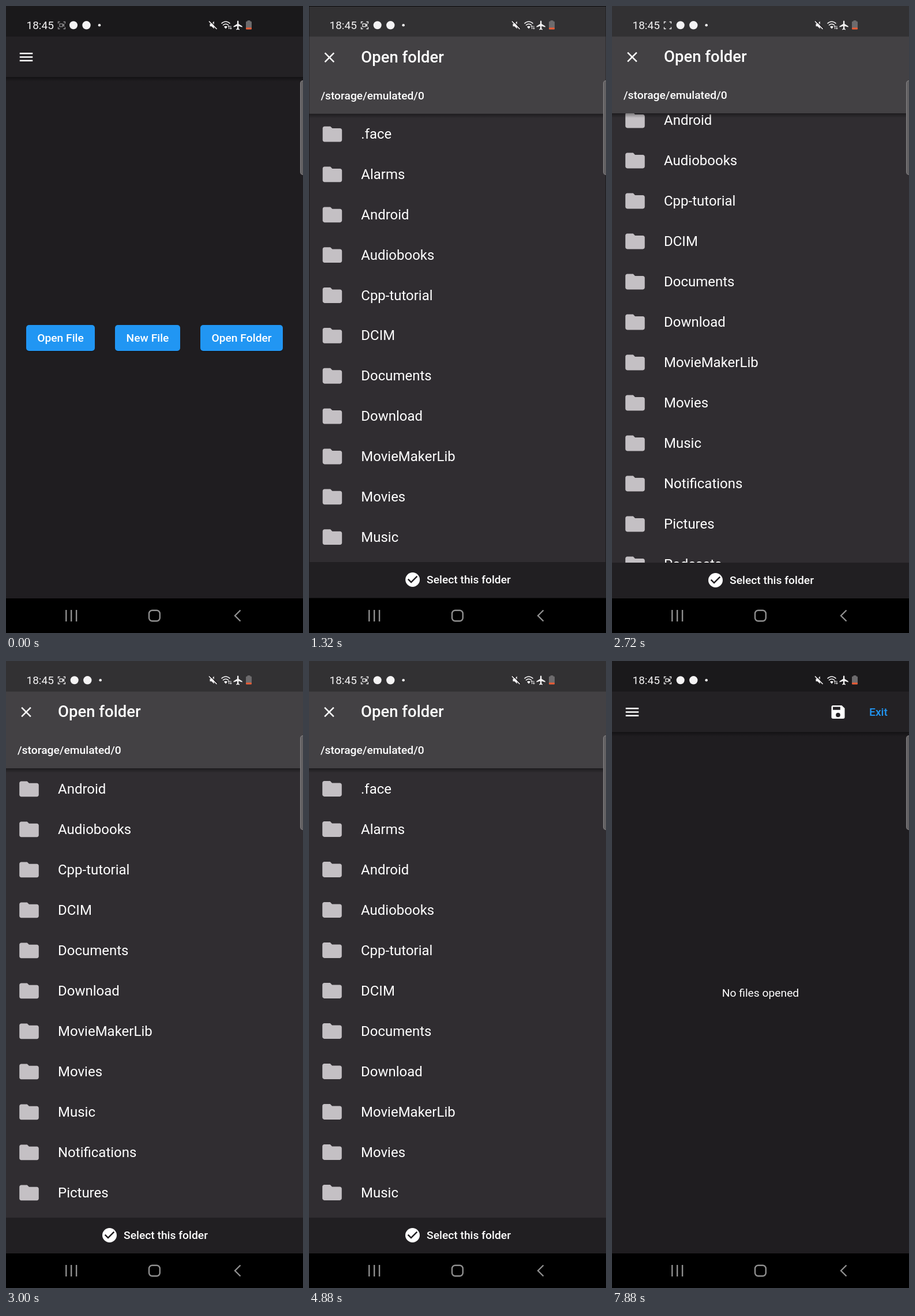
These frames come from a looping animation (515x1087 px, 8280 ms). An HTML page with a canvas:

```html
<!DOCTYPE html>
<html lang="en">
<head>
<meta charset="utf-8">
<title>Open folder</title>
<style>
  html, body { margin: 0; width: 100%; height: 100%; overflow: hidden; background: #000; }
  canvas { display: block; }
</style>
</head>
<body>
<canvas id="stage" width="515" height="1087"></canvas>
<script>
const W = 515, H = 1087, VIEW = 1027, LOOP = 8280;
const OPEN = 1109, CLOSE = 5694, ROUTE = 300;
const PRESS = 826;
const stage = document.getElementById('stage').getContext('2d');
const layerCanvas = Object.assign(document.createElement('canvas'), { width: W, height: H });
const layer = layerCanvas.getContext('2d');
let c = stage;

const folders = ['.face', 'Alarms', 'Android', 'Audiobooks', 'Cpp-tutorial', 'DCIM', 'Documents',
  'Download', 'MovieMakerLib', 'Movies', 'Music', 'Notifications', 'Pictures', 'Podcasts', 'Ringtones'];

// Icon outlines on a 24-unit grid
const icons = {
  menu: 'M3 18h18v-2H3zm0-5h18v-2H3zm0-7v2h18V6z',
  close: 'M19 6.41 17.59 5 12 10.59 6.41 5 5 6.41 10.59 12 5 17.59 6.41 19 12 13.41 17.59 19 19 17.59 13.41 12z',
  folder: 'M10 4H4c-1.1 0-2 .9-2 2v12c0 1.1.9 2 2 2h16c1.1 0 2-.9 2-2V8c0-1.1-.9-2-2-2h-8z',
  save: 'M17 3H5c-1.1 0-2 .9-2 2v14c0 1.1.9 2 2 2h14c1.1 0 2-.9 2-2V7zM12 19a3 3 0 1 1 0-6 3 3 0 0 1 0 6M15 9H5V5h10z',
  check: 'M12 2a10 10 0 1 0 0 20 10 10 0 0 0 0-20M10 17l-5-5 1.41-1.41L10 14.17l7.59-7.59L19 8z',
  plane: 'M21 16v-2l-8-5V3.5a1.5 1.5 0 0 0-3 0V9l-8 5v2l8-2.5V19l-2 1.5V22l3.5-1 3.5 1v-1.5L13 19v-5.5z',
  speaker: 'M3 9v6h4l6 6V3L7 9z'
};
for (const name in icons) icons[name] = new Path2D(icons[name]);

const clamp = x => Math.max(0, Math.min(1, x));
const span = (t, a, b) => clamp((t - a) / (b - a));
const mix = (a, b, k) => a + (b - a) * k;

function bezier(x1, y1, x2, y2, x) {
  const at = (a, b, s) => 3 * (1 - s) * (1 - s) * s * a + 3 * (1 - s) * s * s * b + s ** 3;
  let lo = 0, hi = 1;
  for (let i = 0; i < 24; i++) {
    const mid = (lo + hi) / 2;
    if (at(x1, x2, mid) < x) lo = mid; else hi = mid;
  }
  return at(y1, y2, lo);
}

// Two-part emphasised curve of the page zoom
function zoomEase(p) {
  return p < 1 / 6
    ? 0.4 * bezier(0.05, 0, 0.1333, 0.06, p * 6)
    : 0.4 + 0.6 * bezier(0.2083, 0.82, 0.25, 1, (p - 1 / 6) * 1.2);
}

function rect(x, y, w, h, color, r = 0) {
  c.fillStyle = color;
  c.beginPath();
  c.roundRect(x, y, w, h, r);
  c.fill();
}

function dot(x, y, r, color) {
  c.fillStyle = color;
  c.beginPath();
  c.arc(x, y, r, 0, 7);
  c.fill();
}

function stroke(d, color, width) {
  c.strokeStyle = color;
  c.lineWidth = width;
  c.stroke(new Path2D(d));
}

function icon(name, x, y, scale = 1.25, color = '#fff') {
  c.save();
  c.translate(x - 12 * scale, y - 12 * scale);
  c.scale(scale, scale);
  c.fillStyle = color;
  c.fill(icons[name], 'evenodd');
  c.restore();
}

function text(s, x, y, size, { weight = 500, align = 'left', color = '#fff' } = {}) {
  c.font = `${weight} ${size}px Roboto, sans-serif`;
  c.textAlign = align;
  c.fillStyle = color;
  c.fillText(s, x, y + size * 0.342);
}

function shadow(y) {
  const g = c.createLinearGradient(0, y, 0, y + 8);
  g.addColorStop(0, 'rgba(0,0,0,.38)');
  g.addColorStop(1, 'rgba(0,0,0,0)');
  c.fillStyle = g;
  c.fillRect(0, y, W, 8);
}

function zoomed(scale, draw) {
  c.save();
  c.beginPath();
  c.rect(0, 0, W, VIEW);
  c.clip();
  c.translate(W / 2, VIEW / 2);
  c.scale(scale, scale);
  c.translate(-W / 2, -VIEW / 2);
  draw();
  c.restore();
}

function page() {
  rect(0, 0, W, VIEW, '#1f1d20');
  shadow(123);
  rect(0, 0, W, 123, '#232124');
  icon('menu', 35, 88.5);
}

function button(label, x, w) {
  rect(x, 554.5, w, 45, 'rgba(0,0,0,.3)', 5);
  rect(x, 553, w, 45, '#2196f3', 5);
  return () => text(label, x + w / 2, 575.5, 19.25, { align: 'center' });
}

function home(t) {
  page();
  button('Open File', 35, 119)();
  button('New File', 189, 113)();
  const label = button('Open Folder', 337, 143);
  if (t > PRESS) {
    const k = span(t, PRESS, 1350);
    const alpha = 0.26 * span(t, PRESS, 900) * (1 - span(t, 1180, 1400));
    c.save();
    c.beginPath();
    c.roundRect(337, 553, 143, 45, 5);
    c.clip();
    dot(mix(426, 415, k), mix(580, 576, k), mix(22, 75, k), `rgba(255,255,255,${alpha})`);
    c.restore();
  }
  label();
}

function editor() {
  page();
  icon('save', 392, 88.5, 1.28);
  text('Exit', 462, 88.5, 19.25, { align: 'center', color: '#2196f3' });
  text('No files opened', W / 2, 575, 19.25, { weight: 400, align: 'center' });
}

function scrollAt(t) {
  const up = span(t, 2490, 2870), down = span(t, 2870, 3320);
  return 248 * up * up * (3 - 2 * up) * (1 - down ** 1.5) ** 3.36;
}

function picker(t) {
  rect(0, 0, W, VIEW, '#302d31');
  const top = 221 - scrollAt(t);
  folders.forEach((name, i) => {
    const y = top + i * 70;
    if (y < 150 || y > 1000) return;
    icon('folder', 40, y + 0.5, 1.68, '#c4c0c4');
    text(name, 90, y + 0.3, 24, { weight: 400 });
  });
  shadow(186);
  rect(0, 0, W, 186, '#434144');
  icon('close', 35, 88.5);
  text('Open folder', 90, 88, 27.5);
  text('/storage/emulated/0', 20, 154.5, 19.25);
  rect(0, 965, W, 62, '#211f22');
  icon('check', 179.5, 995.5);
  text('Select this folder', 204, 995.5, 19.25);
}

// Composed apart so that it fades as one sheet
function fadedPicker(t, scale, alpha) {
  c = layer;
  c.clearRect(0, 0, W, H);
  zoomed(scale, () => picker(t));
  c = stage;
  c.globalAlpha = alpha;
  c.drawImage(layerCanvas, 0, 0);
  c.globalAlpha = 1;
}

function app(t) {
  if (t < OPEN) return zoomed(1, () => home(t));
  if (t < OPEN + ROUTE) {
    const p = (t - OPEN) / ROUTE, e = zoomEase(p);
    zoomed(mix(1, 1.05, e), () => home(t));
    rect(0, 0, W, VIEW, `rgba(0,0,0,${0.6 * span(p, 0.125, 0.4175)})`);
    return fadedPicker(t, mix(0.85, 1, e), span(p, 0.125, 0.28));
  }
  if (t < CLOSE) return zoomed(1, () => picker(t));
  const p = span(t, CLOSE, CLOSE + ROUTE), e = zoomEase(p);
  zoomed(mix(1.1, 1, e), editor);
  if (p < 0.2075) fadedPicker(t, mix(1, 0.9, e), 1 - span(p, 0.0825, 0.2075));
}

function statusBar(t) {
  rect(0, 0, W, 53, 'rgba(0,0,0,.25)');
  const white = '#f4f3f4', k = span(t, 0, 400);
  text('18:45', 35.5, 34, 19, { weight: 400, color: white });

  // Recorder mark: steady corners, blinking camera
  c.globalAlpha = mix(0.55, 1, k);
  stroke('M90.5 30.5v-3h3M99.5 27.5h3v3M102.5 36.5v3h-3M93.5 39.5h-3v-3', white, 1.3);
  if (Math.floor((t - 1830) / 502) % 2 === 0) {
    stroke('M93 30.8h5v5h-5zM98.5 33l2-1.5v3.6l-2-1.5', white, 1.2);
  }
  c.globalAlpha = 1;
  dot(mix(117, 118.7, k), 33.3, 7, white);
  dot(mix(139.5, 141.3, k), 33.3, 7.2, white);
  dot(mix(162, 163.7, k), 33.3, 2.3, white);

  icon('speaker', 360, 33, 0.72, white);
  stroke('M353.5 25.5l14 14', '#1d1b1d', 1.6);
  stroke('M352 26.5l13.5 13.5', white, 1.6);

  stroke('M373.5 30.5q7.5-7 15 0M376 33.5q5-4.5 10 0', white, 1.6);
  c.fillStyle = white;
  c.fill(new Path2D('M378 36q3-2.4 6 0l-3 3.5z'));
  stroke('M386.6 40v-5.5M385 36l1.6-1.8 1.6 1.8M389.8 34.5v5.5M388.2 38.3l1.6 1.8 1.6-1.8', white, 1);
  icon('plane', 402.5, 33.5, 0.8, white);
  rect(418.5, 25, 5, 3, '#6d6b6d', 1);
  rect(416, 26.5, 10, 14, '#6d6b6d', 1.5);
  rect(416, 37.5, 10, 3, '#ee5a32', 1);
}

function systemBars(t) {
  statusBar(t);
  rect(510, 129, 12, 164, '#858385', 5);
  rect(511, 130, 12, 162, '#636163', 4);
  rect(0, VIEW, W, H - VIEW, '#000');
  stroke('M104.3 1047v20M113.2 1047v20M122.1 1047v20M406.5 1047.5l-9.5 9.5 9.5 9.5', '#8f8f8f', 2.4);
  c.beginPath();
  c.roundRect(248, 1047.8, 18.8, 18.4, 5.5);
  c.stroke();
}

function frame(now) {
  const t = now % LOOP;
  app(t);
  systemBars(t);
  requestAnimationFrame(frame);
}
requestAnimationFrame(frame);
</script>
</body>
</html>
```
